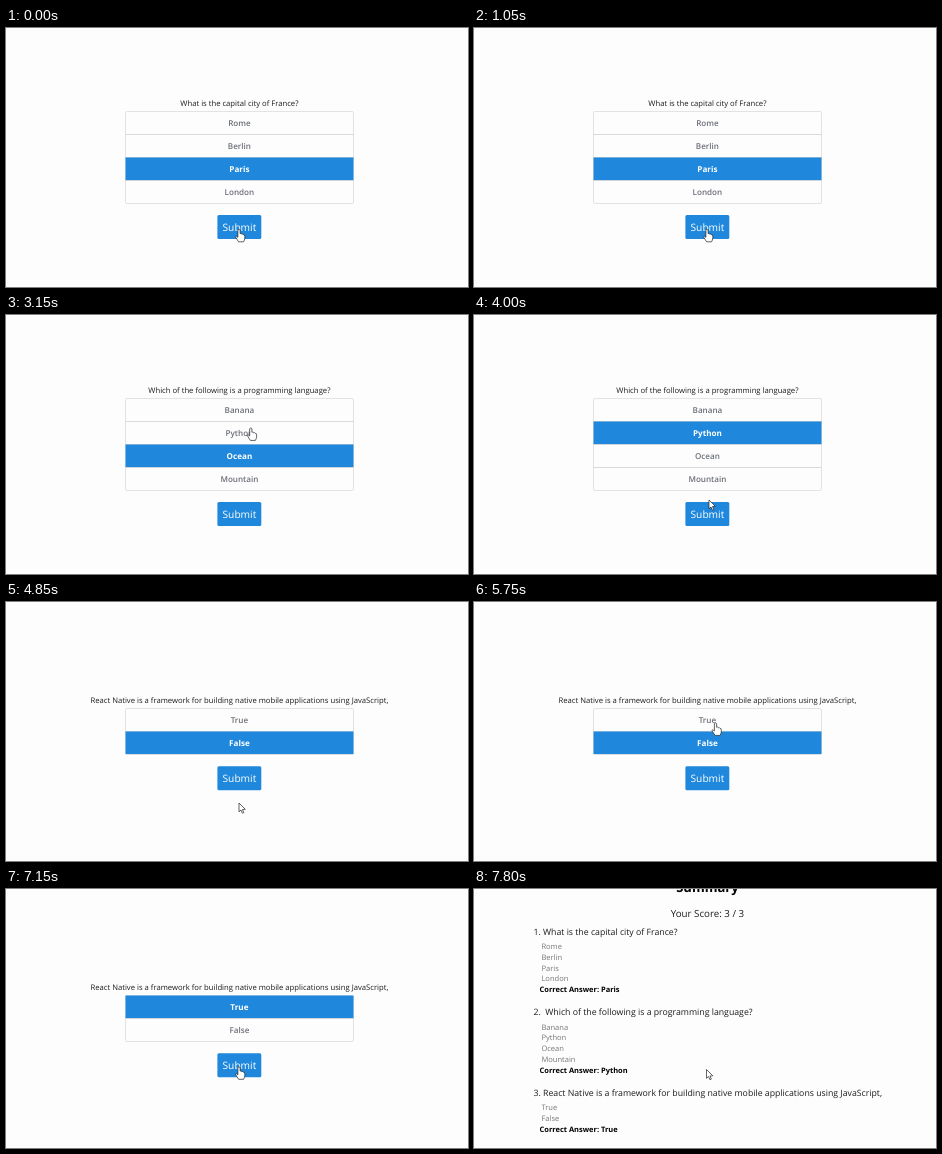
Recreate the animation shown at these times as an HTML page with a canvas. Size 462x259 px, loop 9650 ms.

```html
<!DOCTYPE html>
<html lang="en">
<head>
<meta charset="utf-8">
<title>Quiz</title>
<style>
  html, body { margin: 0; width: 100%; height: 100%; overflow: hidden; background: #fdfdfd; }
  canvas { display: block; width: 462px; height: 259px; }
</style>
</head>
<body>
<canvas></canvas>
<script>
const W = 462, H = 259, LOOP = 9650, MID = 233.4;
const BLUE = '#1f88dc', ROW = 22.85, LEFT = 119, WIDTH = 229;
const SUMMARY_AT = 7200;

const quiz = [
  { text: 'What is the capital city of France?', options: ['Rome', 'Berlin', 'Paris', 'London'], answer: 'Paris' },
  { text: 'Which of the following is a programming language?', options: ['Banana', 'Python', 'Ocean', 'Mountain'], answer: 'Python' },
  { text: 'React Native is a framework for building native mobile applications using JavaScript,', options: ['True', 'False'], answer: 'True' },
];

// start time, question, selected option
const states = [[0, 0, 2], [1200, 1, 2], [3300, 1, 1], [4500, 2, 1], [6200, 2, 0]];

// time, x, y of the pointer tip
const path = [
  [0, 233, 201], [2250, 233, 201], [2950, 244.8, 112.6], [3400, 244.8, 112.6],
  [4000, 235, 185], [4300, 233, 201], [5150, 233, 201], [5700, 241.5, 120.6],
  [6300, 241.5, 120.6], [6950, 233, 177.5], [7200, 233, 177.5], [7250, 232.5, 180.5], [LOOP, 232.5, 180.5],
];

const arrow = new Path2D('M0 0V8.8L2 7L3.4 10.2L4.8 9.6L3.5 6.5L6.3 6.3Z');
const hand = new Path2D('M-1.1 1.1Q0-.5 1.1 1.1V4.6Q2.2 4 2.8 5.1Q3.9 4.6 4.4 5.7Q5.8 5.6 5.8 7.2V9.2Q5.6 11 4.6 12.8H-.4Q-2 10.4-3.6 7.8Q-3.2 6.3-1.1 8.3Z');

const canvas = document.querySelector('canvas');
const ctx = canvas.getContext('2d');
const dpr = window.devicePixelRatio || 1;
canvas.width = W * dpr;
canvas.height = H * dpr;
ctx.scale(dpr, dpr);
ctx.textRendering = 'geometricPrecision';

function write(text, x, y, size, color = '#1c1c1c', weight = 400, align = 'left') {
  ctx.font = `${weight} ${size}px "Open Sans", "Noto Sans", sans-serif`;
  ctx.textAlign = align;
  ctx.fillStyle = color;
  ctx.fillText(text, x, y);
}

function pointerAt(t) {
  const i = path.findIndex(key => key[0] > t);
  const [t0, x0, y0] = path[i - 1], [t1, x1, y1] = path[i];
  const u = (t - t0) / (t1 - t0), s = u * u * (3 - 2 * u);
  return [x0 + (x1 - x0) * s, y0 + (y1 - y0) * s];
}

function drawPointer(shape, x, y) {
  ctx.save();
  ctx.translate(x, y);
  ctx.fillStyle = '#fff';
  ctx.strokeStyle = '#222';
  ctx.lineWidth = 0.7;
  ctx.lineJoin = 'round';
  ctx.fill(shape);
  ctx.stroke(shape);
  ctx.restore();
}

// Returns whether the point (x, y) lies on something clickable.
function drawQuestion({ text, options }, selected, x, y) {
  const top = 129.4 - options.length * ROW / 2;
  const bottom = top + options.length * ROW;
  const button = bottom + 12;
  const edge = i => Math.floor(top + i * ROW);

  write(text, MID, top - 5.6, 7.68, '#1c1c1c', 400, 'center');

  ctx.strokeStyle = '#e3e3e3';
  ctx.lineWidth = 1;
  ctx.beginPath();
  ctx.roundRect(LEFT + 0.5, edge(0) + 0.5, WIDTH - 1, edge(options.length) - edge(0), 1.5);
  ctx.stroke();
  options.forEach((option, i) => {
    if (i) {
      ctx.fillStyle = '#d8d9da';
      ctx.fillRect(LEFT, edge(i), WIDTH, 1);
    }
  });
  ctx.fillStyle = BLUE;
  ctx.fillRect(LEFT + 0.5, edge(selected) + 0.5, WIDTH - 1, ROW - 0.3);
  options.forEach((option, i) => {
    const on = i === selected;
    write(option, MID, top + i * ROW + 14.6, 8.1, on ? '#fff' : '#6b6f78', on ? 700 : 600, 'center');
  });

  ctx.fillStyle = BLUE;
  ctx.beginPath();
  ctx.roundRect(211.4, button, 43.9, 23.9, 1.5);
  ctx.fill();
  write('Submit', MID, button + 16, 10.2, '#fff', 500, 'center');

  return (y > top && y < bottom) || (y > button && y < button + 23.9 && x > 211 && x < 255);
}

function drawSummary() {
  write('Summary', MID, 3, 13, '#000', 700, 'center');
  write('Your Score: 3 / 3', MID, 28, 9.75, '#1c1c1c', 400, 'center');
  quiz.forEach(({ text, options, answer }, i) => {
    const y = 46 + i * 80.4;
    const gap = i === 1 ? '\u00a0\u00a0' : ' ';
    write(`${i + 1}.${gap}${text}`, 59.4, y, 8.74);
    options.forEach((option, j) => write(option, 67.4, y + 14.2 + j * 10.75, 7.55, '#777'));
    write(`Correct Answer: ${answer}`, 65.5, y + 14.2 + options.length * 10.75, 7.48, '#000', 700);
  });
}

function draw(t) {
  const [x, y] = pointerAt(t);
  let clickable = false;
  ctx.fillStyle = '#fdfdfd';
  ctx.fillRect(0, 0, W, H);
  if (t >= SUMMARY_AT) {
    drawSummary();
  } else {
    const [, question, selected] = states.filter(s => s[0] <= t).pop();
    clickable = drawQuestion(quiz[question], selected, x, y);
  }
  drawPointer(clickable ? hand : arrow, x, y);
}

const start = performance.now();
function tick() {
  draw((performance.now() - start) % LOOP);
  requestAnimationFrame(tick);
}
tick();
</script>
</body>
</html>
```
